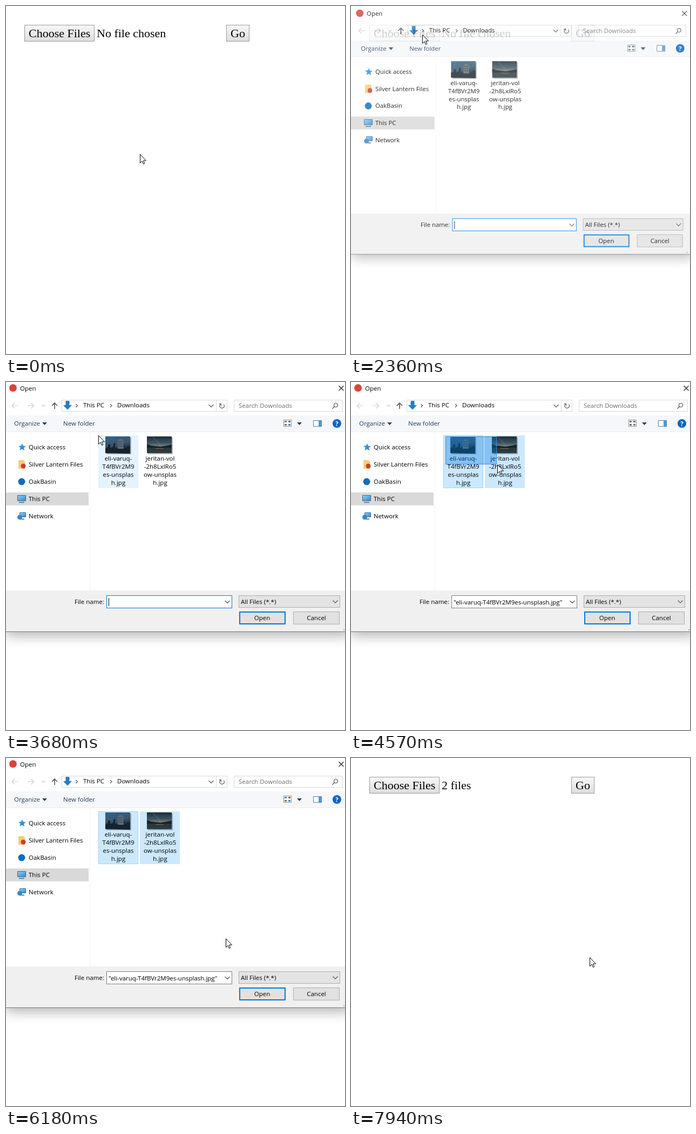
Animation of 628 by 646 pixels, one loop 7.99 s. Source, as an HTML page:

```html
<!DOCTYPE html>
<html lang="en">
<head>
<meta charset="utf-8">
<title>File picker</title>
<style>
html, body { margin: 0; width: 100%; height: 100%; overflow: hidden; background: #fff; }
svg { display: block; width: 628px; height: 646px; }
.page { font: 22px "Liberation Serif", "Times New Roman", serif; }
.ui { font: 11.5px "Open Sans", "Noto Sans", sans-serif; }
.mid { text-anchor: middle; }
.line { fill: none; stroke: #555; stroke-width: 1.2; }
.pale { stroke: #ccc; }
.box { fill: #fff; stroke: #d9d9d9; }
.tool { fill: #1e395b; }
</style>
</head>
<body>
<svg viewBox="0 0 628 646">
  <defs>
    <linearGradient id="face" x2="0" y2="1"><stop stop-color="#f8f8f8"/><stop offset="1" stop-color="#ddd"/></linearGradient>
    <linearGradient id="down" x2="0" y2="1"><stop stop-color="#dcdcdc"/><stop offset="1" stop-color="#f1f1f1"/></linearGradient>
    <filter id="blur" x="-10%" y="-10%" width="120%" height="120%"><feGaussianBlur stdDeviation="12"/></filter>
    <linearGradient id="city" x2=".3" y2="1"><stop stop-color="#2f5f88"/><stop offset=".55" stop-color="#3a566c"/><stop offset="1" stop-color="#16222a"/></linearGradient>
    <linearGradient id="lake" x2="0" y2="1">
      <stop stop-color="#1f2c36"/><stop offset=".4" stop-color="#3d5663"/>
      <stop offset=".6" stop-color="#7c8480"/><stop offset=".68" stop-color="#2a3636"/><stop offset="1" stop-color="#2c3d44"/>
    </linearGradient>
    <linearGradient id="screen" x2="1" y2="1"><stop stop-color="#8fd0f7"/><stop offset="1" stop-color="#2b8ad6"/></linearGradient>
  </defs>

  <g class="page">
    <rect id="choose" x="34.5" y="35.5" width="129" height="30"/>
    <text x="42" y="58">Choose Files</text>
    <text id="chosen" x="168" y="58"></text>
    <rect x="408.500" y="35.5" width="42" height="30" fill="url(#face)" stroke="#999"/>
    <text x="416" y="58">Go</text>
  </g>

  <g id="dialog" class="ui">
    <rect x="-1" y="20" width="640" height="450" opacity=".32" filter="url(#blur)"/>
    <rect x="-6" y="-6" width="644" height="469" fill="#fff"/>

    <circle cx="13" cy="11" r="7" fill="#db4437"/>
    <text x="26" y="16">Open</text>
    <path class="line" style="stroke:#222" d="M616.500 7l9 9m0-9l-9 9"/>

    <path class="line pale" d="M22.500 44H11m5-5l-5 5 5 5M40 44h11.500m-5-5l5 5-5 5M66.500 42.500l3 3 3-3"/>
    <path class="line" style="stroke-width:1.6" d="M90 50V39m-5 5l5-5 5 5"/>
    <rect class="box" x="103.500" y="33.500" width="306" height="21"/>
    <path stroke="#d9d9d9" d="M389.500 34v20"/>
    <path fill="#1f7ed0" d="M110.500 35h7v8h4.500l-8 8.500-8-8.500h4.500z"/>
    <path class="line" d="M129.500 41l3 3-3 3M193 41l3 3-3 3M375.500 42l4.500 4.500 4.500-4.500M403.500 41.500a4.300 4.300 0 1 1-5-1.300M395 40.500h3.500v3.500"/>
    <text x="143" y="47">This PC</text>
    <text x="206" y="47">Downloads</text>
    <rect class="box" x="422.500" y="33.500" width="201" height="21"/>
    <text x="431" y="48" fill="#6d6d6d">Search Downloads</text>
    <path class="line" d="M604.500 49.500l4-4"/>
    <circle class="line" cx="611" cy="43" r="3.500"/>

    <rect x="-6" y="62" width="644" height="31" fill="#f5f7f9"/>
    <path stroke="#e9edf0" d="M-6 92.500H638"/>
    <rect id="folderHover" x="91.500" y="65.500" width="86" height="24" fill="#e3f0fa" stroke="#c4dff3"/>
    <text class="tool" x="15" y="81">Organize</text>
    <text class="tool" x="106" y="81">New folder</text>
    <path fill="#333f50" d="M67 75h9l-4.500 5zM539 75h9l-4.500 5z"/>
    <path fill="#fff" stroke="#8a8f96" d="M514.500 70.500h14v12h-14z"/>
    <path fill="#4d82b8" d="M516 72h4v3h-4zM523 78h4v3h-4z"/>
    <path fill="#8b6a4e" d="M523 72h4v3h-4zM516 78h4v3h-4z"/>
    <path fill="#fff" stroke="#5d7c99" d="M569.500 71.500h15v11h-15z"/>
    <path fill="#4c9bd8" d="M579 72h5v10h-5z"/>
    <circle cx="613" cy="77" r="8" fill="#0763c4"/>
    <text class="mid" x="613" y="81.500" fill="#fff" font-weight="700">?</text>

    <path stroke="#f5f5f5" d="M155.500 94V386"/>
    <rect x="-6" y="205" width="159" height="24" fill="#d9d9d9"/>
    <path fill="#2f8fdc" d="M30 114l1.800 4.700 5.200.300-4 3.300 1.200 5-4.200-2.800-4.700 2.500 1.500-5-3.800-3.400 5-.200z"/>
    <path fill="#f4cf78" d="M23 145h10l2 2v14H23z"/>
    <circle cx="32" cy="156" r="4.500" fill="#c8402c"/>
    <circle cx="29" cy="185" r="6.500" fill="#0f6cbd"/>
    <path fill="url(#screen)" stroke="#45627c" d="M21.500 210.500h15v10h-15z"/>
    <path stroke="#45627c" stroke-width="1.500" d="M24 223.500h10"/>
    <path fill="url(#screen)" stroke="#3b6a96" d="M25.500 242.500h11v8h-11z"/>
    <circle cx="25.500" cy="251" r="4.500" fill="#3d86c6"/>
    <path stroke="#46586a" stroke-width="1.500" d="M28 254.500h6"/>
    <text x="42" y="125">Quick access</text>
    <text x="42" y="157">Silver Lantern Files</text>
    <text x="42" y="189">OakBasin</text>
    <text x="42" y="221">This PC</text>
    <text x="42" y="253">Network</text>

    <rect id="item1" x="171.500" y="99.500" width="73" height="97"/>
    <rect id="item2" x="248.500" y="99.500" width="73" height="97"/>
    <path opacity=".3" d="M186 103h46v31h-46zM263 103h46v31h-46z"/>
    <rect x="184" y="101" width="46" height="31" fill="url(#city)"/>
    <path fill="#17232b" d="M184 132v-9l5-2v-5h4v7l6-3v-7h3v9h13v-6h4v6h5v-3h6v14z"/>
    <path fill="#5b6b76" d="M207 109l3-3h5l3 3v15h-11z"/>
    <path stroke="#35434c" d="M208 111h9m-9 4h9m-9 4h9"/>
    <path stroke="#7fa3bd" stroke-dasharray="1 4" opacity=".6" d="M186 104h20m-18 4h16m-14 5h12m14-8h12m-9 6h8"/>
    <rect x="261" y="101" width="46" height="31" fill="url(#lake)"/>
    <path fill="#182224" d="M261 115l8 3 9 1 8 1 12-2 9-2v6h-46z"/>
    <path stroke="#b0745a" opacity=".75" d="M277 123.500h15"/>
    <path stroke="#7397ad" opacity=".6" d="M272 102l14 15"/>
    <g class="mid" id="labels"></g>
    <rect id="band" x="175.500" y="101.500" fill="#0078d7" fill-opacity=".35" stroke="#3c8edb"/>

    <rect x="-6" y="387" width="644" height="76" fill="#f0f0f0"/>
    <text x="127" y="412">File name:</text>
    <rect id="field" x="186.500" y="396.500" width="232" height="23" fill="#fff"/>
    <path id="caret" stroke="#000" d="M190.500 401v15"/>
    <text id="fileName" x="190" y="413">"eli-varuq-T4fBVr2M9es-unsplash.jpg"</text>
    <rect x="431.500" y="396.500" width="187" height="22" fill="#e3e3e3" stroke="#adadad"/>
    <text x="435" y="412">All Files (*.*)</text>
    <path class="line" d="M405.500 406l4.500 4.500 4.500-4.500M605.500 405.500l4.500 4.500 4.500-4.500"/>
    <rect id="open" x="433" y="427" width="84" height="22" stroke="#0078d7" stroke-width="2"/>
    <rect x="532.500" y="426.500" width="85" height="23" fill="#e1e1e1" stroke="#adadad"/>
    <text class="mid" x="474.500" y="442">Open</text>
    <text class="mid" x="575" y="442">Cancel</text>
    <path fill="#aaa" d="M625 459h2v2h-2z"/>
    <path stroke="#777" d="M-6 463.500H638"/>
  </g>

  <path id="cursor" fill="#fff" stroke="#000" d="M.5.5V16.500L4.200 13 6.500 18.500 8.800 17.500 6.500 12H11.500z"/>
</svg>

<script>
const LOOP = 7990;
const $ = id => document.getElementById(id);
const set = (id, attrs) => { for (const k in attrs) $(id).setAttribute(k, attrs[k]); };
const show = (id, on) => set(id, { visibility: on ? 'inherit' : 'hidden' });
const clamp = v => Math.max(0, Math.min(1, v));

// Pointer path: time, x, y
const path = [
  [0, 248, 275], [400, 248, 275], [1220, 142, 101], [1620, 132, 54], [1799, 132, 54],
  [1800, 132, 53], [3030, 132, 53], [3680, 171, 99], [3780, 175, 101], [3990, 175, 101],
  [4570, 271, 153], [4800, 305, 176], [5030, 321, 187], [5489, 321, 187], [5490, 321, 188],
  [5620, 321, 188], [6180, 407, 335], [6410, 435, 388], [6920, 456, 434], [7820, 456, 434],
  [7940, 442, 370], [7990, 442, 370]
];

const labels = [
  [208, ['eli-varuq-', 'T4fBVr2M9', 'es-unsplas', 'h.jpg']],
  [285.5, ['jeritan-vol', '-2h8LxlRo5', 'ow-unsplas', 'h.jpg']]
];
$('labels').innerHTML = labels.map(([x, rows]) =>
  rows.map((s, i) => `<text x="${x}" y="${146 + 15 * i}">${s}</text>`).join('')).join('');

// Slope at a key, flat where the motion rests or turns
function slope(i, axis) {
  const a = path[i - 1], b = path[i], c = path[i + 1];
  if (!a || !c || (b[axis] - a[axis]) * (c[axis] - b[axis]) <= 0) return 0;
  return (c[axis] - a[axis]) / (c[0] - a[0]);
}

function pointer(t) {
  let i = 0;
  while (i < path.length - 2 && t >= path[i + 1][0]) i++;
  const a = path[i], b = path[i + 1], d = b[0] - a[0], u = clamp((t - a[0]) / d);
  return [1, 2].map(k => Math.round(
    a[k] + (b[k] - a[k]) * u * u * (3 - 2 * u) +
    d * u * (1 - u) * (slope(i, k) * (1 - u) - slope(i + 1, k) * u)));
}

function draw(t) {
  const [x, y] = pointer(t);
  const within = (l, top, r, b) => x >= l && x < r && y >= top && y < b;
  const between = (a, b) => t >= a && t < b;
  set('cursor', { transform: `translate(${x} ${y})` });

  const opened = between(2150, 7380);
  const pressed = between(1950, 2030);
  const over = !opened && within(34, 35, 164, 66);
  set('choose', { fill: pressed ? 'url(#down)' : 'url(#face)', stroke: over ? '#777' : '#999' });
  $('chosen').textContent = t < 7250 ? 'No file chosen' : '2 files';

  show('dialog', opened);
  if (!opened) return;

  const enter = clamp((t - 2150) / 340), leave = clamp((t - 7150) / 230);
  const scale = 1 - .1 * (1 - enter) ** 2.3 - .1 * leave;
  set('dialog', {
    opacity: (1 - (1 - enter) ** 1.7) * (1 - leave),
    transform: `translate(316 231.5) scale(${scale}) translate(-316 -231.5)`
  });

  const dragging = between(4010, 5210);
  show('folderHover', t > 3030 && within(91, 65, 178, 90));
  show('band', dragging);
  set('band', { width: Math.max(0, x - 177), height: Math.max(0, y - 102) });

  const paint = (id, selected, framed, hover) => {
    const fill = selected ? '#cce8ff' : hover ? '#e5f3ff' : 'none';
    set(id, { fill, stroke: selected && framed ? '#99d1ff' : fill });
  };
  const hover2 = !dragging && within(248, 99, 322, 197);
  paint('item1', t >= 4060, true, within(171, 99, 245, 197));
  paint('item2', t >= 4060 && x > 255, hover2, hover2);

  set('field', { stroke: t < 4010 ? '#0078d7' : '#7a7a7a' });
  show('caret', t < 4010 && Math.floor((t - 2190) / 530) % 2 === 0);
  show('fileName', t >= 4060);
  set('open', { fill: between(7000, 7100) ? '#cce4f7' : within(432, 426, 518, 450) ? '#e5f1fb' : '#e1e1e1' });
}

const start = performance.now();
(function tick() {
  draw((performance.now() - start) % LOOP);
  requestAnimationFrame(tick);
})();
</script>
</body>
</html>
```
